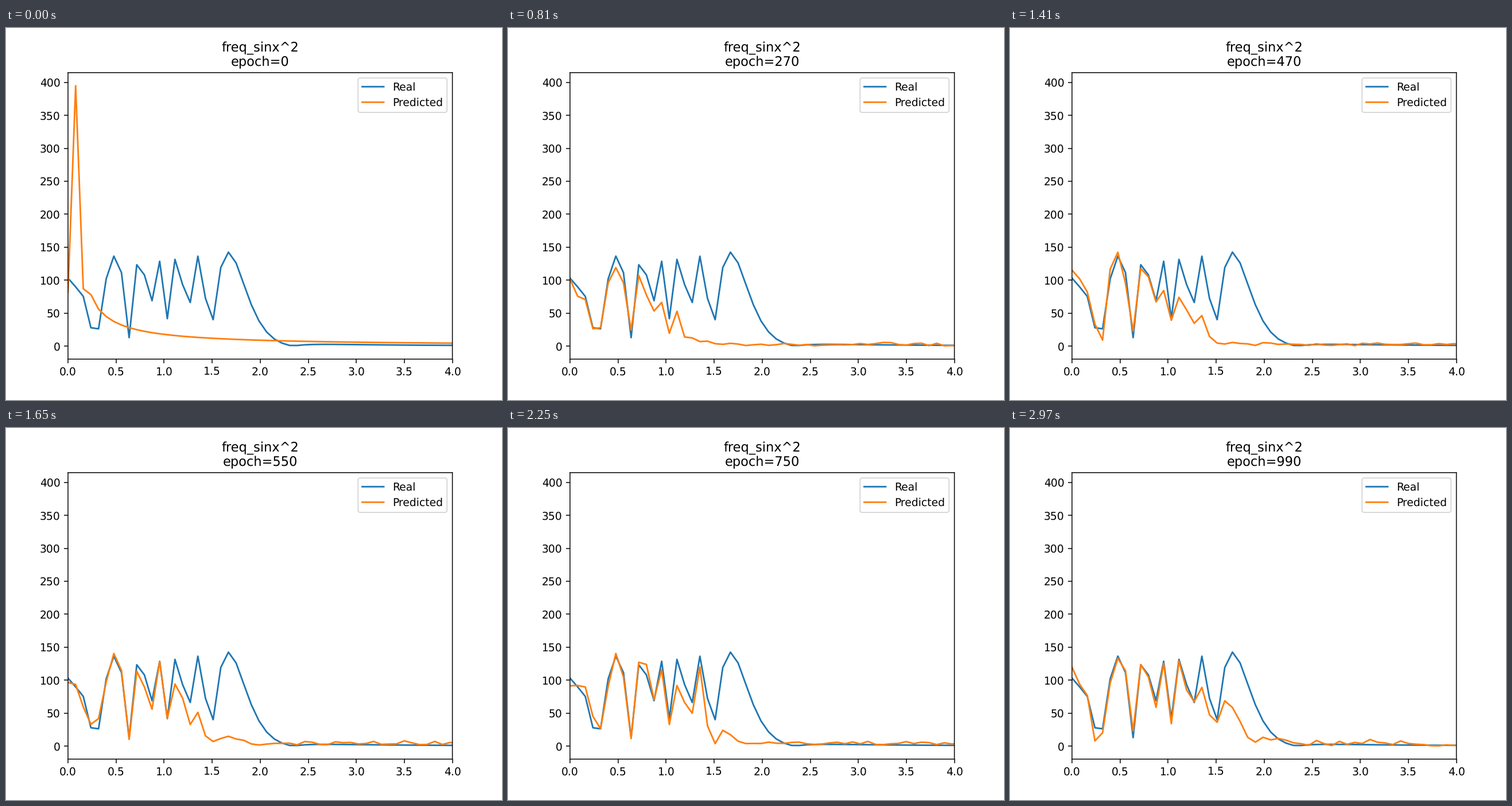
Animation of 864x648 px, one loop 3000 ms. Source, as a matplotlib script:

```python
import numpy as np
import matplotlib.pyplot as plt
from matplotlib.animation import FuncAnimation

FRAMES, INTERVAL, STEP = 100, 30, 10
BINS = 52

# Unhinted, unsnapped drawing keeps text and frame at their true positions
plt.rcParams.update({"text.hinting": "none", "path.snap": False})

# Spectrum of the true signal sin(x^2)
x = np.linspace(-2 * np.pi, 2 * np.pi, 1000)
k = np.arange(BINS)
freq = k / (len(x) * (x[1] - x[0]))
target = np.fft.fft(np.sin(x ** 2))[:BINS]

# Untrained model: one strong low bin, then a 1/k tail
start = 224 / np.maximum(k, 1)
start[:4] = 82, 395, 87, 78


def predicted(epoch):
    """Low-pass view of the target whose cutoff rises as training goes on."""
    untrained = np.exp(-epoch / 25)
    cutoff = 0.78 * (epoch / 140) ** 0.35
    gate = 1 / (1 + np.exp((freq - cutoff) / 0.13))

    # Errors are largest at the cutoff; a small ripple grows in the tail
    ripple = 4 * (1 - np.exp(-epoch / 400))
    spread = ripple + 6 * gate + 24 * gate * (1 - gate)
    rng = np.random.default_rng(epoch)
    error = spread * (rng.normal(size=BINS) + 1j * rng.normal(size=BINS))

    learned = np.abs(target * gate + error)
    return start * untrained + learned * (1 - untrained)


fig, ax = plt.subplots(figsize=(6.4, 4.8), dpi=135)
ax.plot(freq, np.abs(target), label="Real")
line, = ax.plot(freq, start, label="Predicted")
ax.set_xlim(0, 4)
ax.set_ylim(-19.7, 414.8)
ax.legend(loc="upper right", labelspacing=0.46, borderpad=0.385)
title = ax.set_title("freq_sinx^2\nepoch=0")


def update(i):
    epoch = i * STEP
    line.set_ydata(predicted(epoch))
    title.set_text(f"freq_sinx^2\nepoch={epoch}")
    return line, title


anim = FuncAnimation(fig, update, frames=FRAMES, interval=INTERVAL,
                     repeat=True, repeat_delay=0, blit=False)
plt.show()
```
